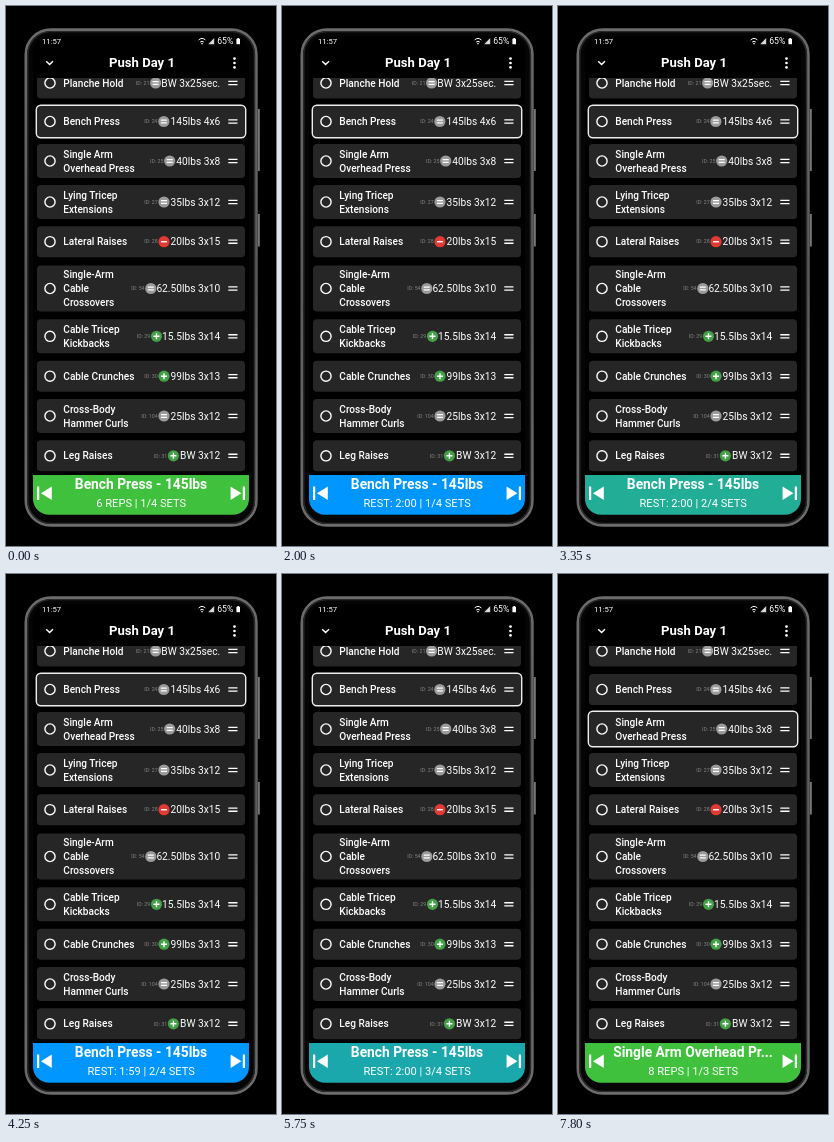
These frames come from a looping animation (270x540 px, 8 s). An HTML page:

```html
<!DOCTYPE html>
<html lang="en">
<head>
<meta charset="utf-8">
<title>Workout player</title>
<style>
  html, body { margin: 0; width: 100%; height: 100%; overflow: hidden; background: #000; }
  svg { display: block; width: 270px; height: 540px; font-family: Roboto, sans-serif; fill: #fff; }
  .card { fill: #262626; }
  .card.on { stroke: #eee; stroke-width: 2.8; paint-order: stroke; }
  .name { font-size: 10.1px; font-weight: 500; }
  .value { font-size: 10.2px; text-anchor: end; }
  .id { font-size: 5.3px; fill: #858585; text-anchor: end; }
  .line { fill: none; stroke: #fff; stroke-width: 1.4; }
  .mid { text-anchor: middle; }
</style>
</head>
<body>
<svg viewBox="0 0 270 540">
  <defs>
    <linearGradient id="rim" x2="0" y2="1">
      <stop offset="0" stop-color="#6c6c6c"/>
      <stop offset=".5" stop-color="#5a5a5a"/>
      <stop offset="1" stop-color="#6c6c6c"/>
    </linearGradient>
    <clipPath id="view"><rect x="27" y="72" width="216" height="397"/></clipPath>
  </defs>

  <!-- Phone -->
  <rect width="270" height="540" fill="#000"/>
  <path d="M252.8 103V165M252.8 208V240.5" stroke="#777" stroke-width="2"/>
  <rect x="19.8" y="23.6" width="230.6" height="495.8" rx="25" fill="#050505" stroke="url(#rim)" stroke-width="2.6"/>
  <rect x="21.8" y="25.6" width="226.6" height="491.8" rx="23" fill="none" stroke="#2a2a2a" stroke-width="1.4"/>
  <rect x="27" y="30" width="216" height="478.8" rx="16" fill="#000"/>

  <!-- Status and header -->
  <text x="36" y="38" font-size="7.7">11:57</text>
  <path class="line" d="M192.6 34Q196 30.8 199.4 34M194.2 36Q196 34.4 197.8 36" style="stroke-width:1"/>
  <circle cx="196" cy="37.6" r=".8"/>
  <path d="M202.2 38.2H208.2V32Z" opacity=".85"/>
  <text x="211.2" y="38.2" font-size="8.7">65%</text>
  <path d="M230.4 32.8H231.4V32H233V32.8H234V38.2H230.4Z"/>
  <path class="line" d="M40.2 55.2L43.6 58.6L47 55.2"/>
  <text class="mid" x="136" y="61.2" font-size="13.1" font-weight="700">Push Day 1</text>
  <circle cx="228.5" cy="52.6" r="1.35"/>
  <circle cx="228.5" cy="57" r="1.35"/>
  <circle cx="228.5" cy="61.4" r="1.35"/>

  <g id="list" clip-path="url(#view)"></g>

  <!-- Player bar -->
  <path id="bar" d="M27 469H243V492.8A16 16 0 0 1 227 508.8H43A16 16 0 0 1 27 492.8Z"/>
  <path d="M31 480.6H33.2V494H31ZM45.8 480.6V494L35 487.3Z"/>
  <path d="M239 480.6H236.8V494H239ZM224.6 480.6V494L235.4 487.3Z"/>
  <text class="mid" id="title" x="135" y="483.3" font-size="13.8" font-weight="700"></text>
  <text class="mid" id="sub" x="135.2" y="501" font-size="11.1"></text>
</svg>

<script>
const $ = id => document.getElementById(id);
const LOOP = 8000, FADE = 260, TICK = 50;
const GREEN = [64, 193, 61], BLUE = [0, 150, 255];

// name lines, centre y, id, sign, icon x, value
const rows = [
  ['Planche Hold', 77, 21, '=', 149.6, 'BW 3x25sec.'],
  ['Bench Press', 115.5, 24, '=', 157.8, '145lbs 4x6'],
  ['Single Arm|Overhead Press', 155, 25, '=', 163.7, '40lbs 3x8'],
  ['Lying Tricep|Extensions', 196, 27, '=', 158, '35lbs 3x12'],
  ['Lateral Raises', 235.7, 28, '-', 158, '20lbs 3x15'],
  ['Single-Arm|Cable|Crossovers', 282.5, 54, '=', 144.8, '62.50lbs 3x10'],
  ['Cable Tricep|Kickbacks', 330.3, 29, '+', 150.5, '15.5lbs 3x14'],
  ['Cable Crunches', 370.2, 30, '+', 158, '99lbs 3x13'],
  ['Cross-Body|Hammer Curls', 410, 104, '=', 158, '25lbs 3x12'],
  ['Leg Raises', 449.8, 31, '+', 167.4, 'BW 3x12']
];
const heights = [0, 31, 34, 46];
const signs = {
  '=': ['#9b9b9b', 'M-3-1.4H3M-3 1.4H3'],
  '-': ['#e53935', 'M-3 0H3'],
  '+': ['#43a047', 'M-3 0H3M0-3V3']
};

function rowMarkup([name, y, id, sign, x, value]) {
  const lines = name.split('|'), h = heights[lines.length];
  const [color, mark] = signs[sign];
  const label = lines.map((s, i) =>
    `<text class="name" x="57.3" y="${y + 3.6 + 14 * (i - (lines.length - 1) / 2)}">${s}</text>`).join('');
  return `<rect class="card" x="31" y="${y - h / 2}" width="208" height="${h}" rx="3.8"/>
    <circle class="line" cx="44" cy="${y}" r="5.1"/>${label}
    <text class="id" x="${x - 6.2}" y="${y + 1.7}">ID: ${id}</text>
    <g transform="translate(${x} ${y})"><circle r="5.6" fill="${color}"/><path class="line" d="${mark}"/></g>
    <text class="value" x="214.2" y="${y + 3.6}">${value}</text>
    <path class="line" d="M222.3 ${y - 1.6}h9.2m-9.2 3.2h9.2"/>`;
}
$('list').innerHTML = rows.map(rowMarkup).join('');
const cards = document.querySelectorAll('.card');

// start time, resting, set number
const phases = [
  [-300, false, 1], [1180, true, 1], [2180, false, 2], [3230, true, 2],
  [4910, false, 3], [5600, true, 3], [6465, false, 4]
];

function setText(node, text) {
  if (node.textContent !== text) node.textContent = text;
}

function draw(now) {
  const t = Math.floor(now % LOOP / TICK) * TICK;
  const next = t >= 7800;
  const [start, resting, set] = phases.filter(p => p[0] <= t).pop();
  const p = Math.min(1, (t - start) / FADE);
  const [from, to] = resting ? [GREEN, BLUE] : [BLUE, GREEN];
  const rgb = from.map((c, i) => Math.round(c + (to[i] - c) * p));
  $('bar').setAttribute('fill', `rgb(${rgb})`);

  const left = 120 - Math.floor((t - start) / 1000);
  const clock = Math.floor(left / 60) + ':' + String(left % 60).padStart(2, '0');
  const status = resting ? `REST: ${clock}` : '6 REPS';
  setText($('title'), next ? 'Single Arm Overhead Pr...' : 'Bench Press - 145lbs');
  setText($('sub'), next ? '8 REPS | 1/3 SETS' : `${status} | ${set}/4 SETS`);
  cards[1].classList.toggle('on', !next);
  cards[2].classList.toggle('on', next);
}

const began = performance.now();
function frame() {
  draw(performance.now() - began);
  requestAnimationFrame(frame);
}
frame();
</script>
</body>
</html>
```
